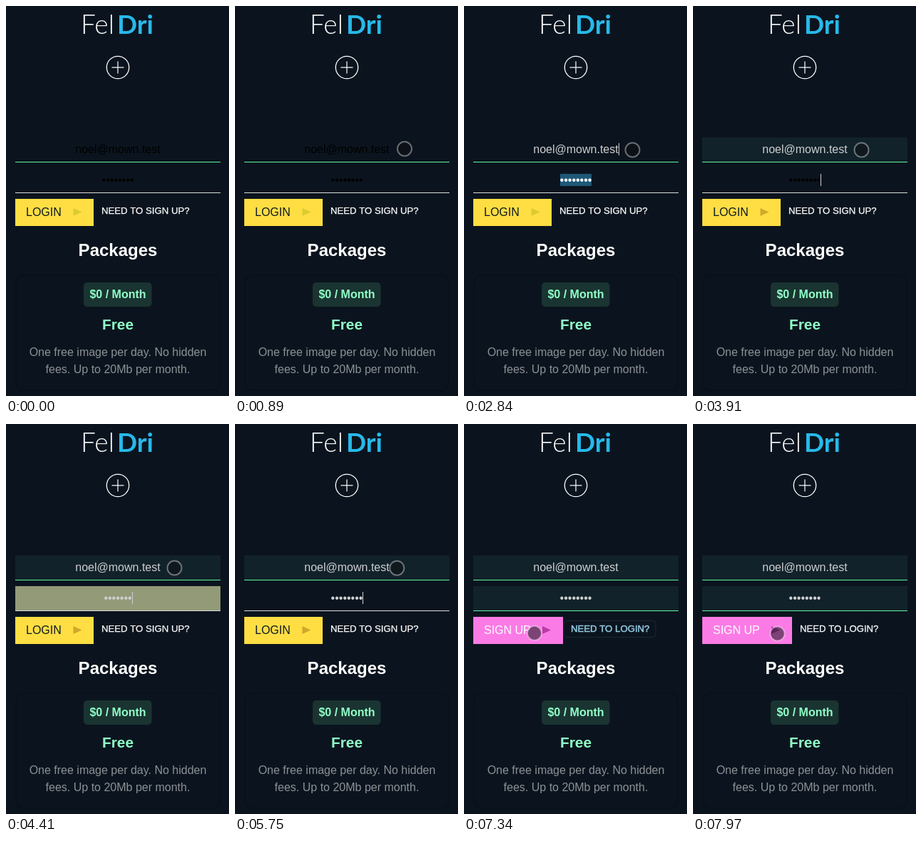
These frames come from a looping animation (313 px wide and 546 px high, 8000 ms). An HTML page with a canvas:

```html
<!DOCTYPE html>
<html lang="en">
<head>
<meta charset="utf-8">
<title>Login form</title>
<style>
html, body { margin: 0; width: 100%; height: 100%; overflow: hidden; background: #0b141e; }
canvas { display: block; width: 313px; height: 546px; }
</style>
</head>
<body>
<canvas id="stage"></canvas>
<script>
const W = 313, H = 546, LOOP = 8000, MID = 157;
const SANS = '"Liberation Sans", Arial, sans-serif';
const EMAIL = 'noel@mown.test';
const GREEN = '#5ffaa0', MINT = '#90ffc8', GREY = '#cdcfd0', DIM = '#8c9195';

const canvas = document.getElementById('stage');
const ctx = canvas.getContext('2d');
const dpr = window.devicePixelRatio || 1;
canvas.width = W * dpr;
canvas.height = H * dpr;

const clamp = v => Math.max(0, Math.min(1, v));
const span = (t, a, b) => clamp((t - a) / (b - a));
const mix = (a, b, p) => a + (b - a) * p;
const easeOut = p => 1 - (1 - p) ** 2;
const smooth = p => p * p * (3 - 2 * p);
const linear = p => p;

// Touch pointer moves: start, end, target x, target y, easing
const START = [272, 492];
const MOVES = [
  [30, 480, 231, 195, easeOut],
  [760, 890, 238, 200, smooth],
  [1030, 1080, 236.5, 201.5, linear],
  [5720, 5750, 227.5, 201.5, linear],
  [5750, 5960, 190, 238, linear],
  [5960, 6180, 128, 297, easeOut],
  [6220, 6340, 159.5, 292.5, smooth],
  [6730, 7020, 84, 293, smooth],
  [7310, 7450, 203, 291, smooth],
  [7780, 7970, 118.5, 293.5, smooth]
];

function pointerAt(t) {
  let [x, y] = START;
  for (const [a, b, tx, ty, ease] of MOVES) {
    if (t < a) break;
    const p = ease(span(t, a, b));
    x = mix(x, tx, p);
    y = mix(y, ty, p);
  }
  return [x, y];
}

function rect(x, y, w, h, color) {
  ctx.fillStyle = color;
  ctx.fillRect(x, y, w, h);
}

function box(x, y, w, h, r) {
  ctx.beginPath();
  ctx.roundRect(x, y, w, h, r);
}

function text(str, x, y, font, color, align = 'left') {
  ctx.font = font;
  ctx.fillStyle = color;
  ctx.textAlign = align;
  ctx.fillText(str, x, y);
}

function disc(x, y, r, fill, stroke, width) {
  ctx.beginPath();
  ctx.arc(x, y, r, 0, Math.PI * 2);
  if (fill) {
    ctx.fillStyle = fill;
    ctx.fill();
  }
  ctx.strokeStyle = stroke;
  ctx.lineWidth = width;
  ctx.stroke();
}

function header() {
  text('Fel', 105, 39, '300 37px Lato, sans-serif', '#fff');
  text('Dri', 207, 39, '700 37px Lato, sans-serif', '#27b9ea', 'right');
  disc(157, 86, 15.7, null, '#fff', 1.3);
  rect(148.5, 85.4, 17, 1.2, '#fff');
  rect(156.4, 77.5, 1.2, 17, '#fff');
}

function packages() {
  text('Packages', MID, 350, `bold 24px ${SANS}`, '#fff', 'center');
  box(14, 377, 286, 161, 10);
  ctx.strokeStyle = '#081019';
  ctx.lineWidth = 2;
  ctx.stroke();
  box(109, 387, 95.5, 34, 5);
  ctx.fillStyle = '#1a3431';
  ctx.fill();
  text('$0 / Month', MID, 409, `bold 16px ${SANS}`, MINT, 'center');
  text('Free', MID, 453, `bold 20.8px ${SANS}`, MINT, 'center');
  text('One free image per day. No hidden', MID, 490, `16px ${SANS}`, DIM, 'center');
  text('fees. Up to 20Mb per month.', MID, 514, `16px ${SANS}`, DIM, 'center');
}

// Input background: autofill glow that fades after an edit, and the valid tint
function field(y, glow, tint, line) {
  if (tint) rect(13, y, 288, 34, `rgba(18,34,42,${tint})`);
  if (glow) rect(13, y, 288, 34, `rgba(250,255,189,${glow})`);
  rect(13, y + 34, 288, 1, line);
}

const glowAt = (t, a, b) => t < a || t >= b ? 0 : 0.94 * (1 - span(t, a, b) ** 2);

function inputText(str, y, color, caret) {
  text(str, MID, y, `16px ${SANS}`, color, 'center');
  if (caret) rect(Math.round(MID + ctx.measureText(str).width / 2), y - 14, 1, 17, GREY);
}

function email(t) {
  field(184, glowAt(t, 2060, 2480), span(t, 2840, 3270), GREEN);
  const cut = t >= 2060 && t < 2450;
  inputText(cut ? EMAIL.slice(0, -1) : EMAIL, 206, t < 2060 ? '#000' : GREY, t >= 2060 && t < 2870);
}

function password(t) {
  field(227, glowAt(t, 4260, 4500), span(t, 6490, 6580), t < 6520 ? '#dcdedc' : GREEN);
  const selected = t >= 2840 && t < 3910;
  if (selected) rect(135, 235, 44, 17, '#1f5877');
  const color = selected ? '#fff' : t < 4260 ? '#000' : GREY;
  const count = t >= 4260 && t < 4640 ? 7 : 8;
  inputText('•'.repeat(count), 249, color, t >= 3910 && t < 6250);
}

function suggestion() {
  rect(13, 219, 288, 26, '#c8ccd0');
  rect(13, 219, 287, 25, '#fff');
  text(EMAIL, 22, 236, '600 12px "Open Sans", "Noto Sans", sans-serif', '#111');
}

function button(label, w, arrowX, fill, ink, arrow) {
  rect(13, 270, w, 38, fill);
  text(label, 28, 294, `16px ${SANS}`, ink);
  ctx.fillStyle = arrow;
  ctx.beginPath();
  ctx.moveTo(arrowX, 283);
  ctx.lineTo(arrowX + 12, 288.5);
  ctx.lineTo(arrowX, 294);
  ctx.fill();
}

function link(label, x, w, hover) {
  if (hover) {
    box(x - 10, 275.5, w, 23, 4);
    ctx.strokeStyle = `rgba(120,190,220,${0.12 * hover})`;
    ctx.lineWidth = 1;
    ctx.stroke();
  }
  const color = `rgb(${mix(255, 146, hover)},${mix(255, 202, hover)},${mix(255, 226, hover)})`;
  text(label, x, 291, `13.2px ${SANS}`, color);
  ctx.strokeStyle = color;
  ctx.lineWidth = mix(0.25, 0.5, hover);
  ctx.strokeText(label, x, 291);
}

function actions(t) {
  if (t < 6520) {
    button('LOGIN', 110, 94.5, '#ffde43', '#0e1a24', t < 3270 ? '#dccb30' : '#cfa92a');
    link('NEED TO SIGN UP?', 134, 143, t < 6490 ? 0 : 1);
  } else {
    button('SIGN UP', 126, 110, '#fb7be6', '#fff', '#b93aa8');
    link('NEED TO LOGIN?', 150, 129, 1 - span(t, 7810, 7980));
  }
}

function pointer(t) {
  if (t < 30) return;
  const [x, y] = pointerAt(t);
  const tapped = t >= 6490 && t < 6580;
  const fill = tapped ? 'rgba(50,108,132,.6)' : 'rgba(14,16,19,.53)';
  const ring = tapped ? 'rgba(160,215,235,.5)' : 'rgba(255,255,255,.38)';
  disc(x, y, 10, fill, ring, 2);
}

function draw(t) {
  ctx.setTransform(dpr, 0, 0, dpr, 0, 0);
  rect(0, 0, W, H, '#0b141e');
  header();
  email(t);
  password(t);
  if (t >= 2060 && t < 2450) suggestion();
  actions(t);
  packages();
  pointer(t);
}

const origin = performance.now();
function tick() {
  draw((performance.now() - origin) % LOOP);
  requestAnimationFrame(tick);
}
tick();
</script>
</body>
</html>
```
